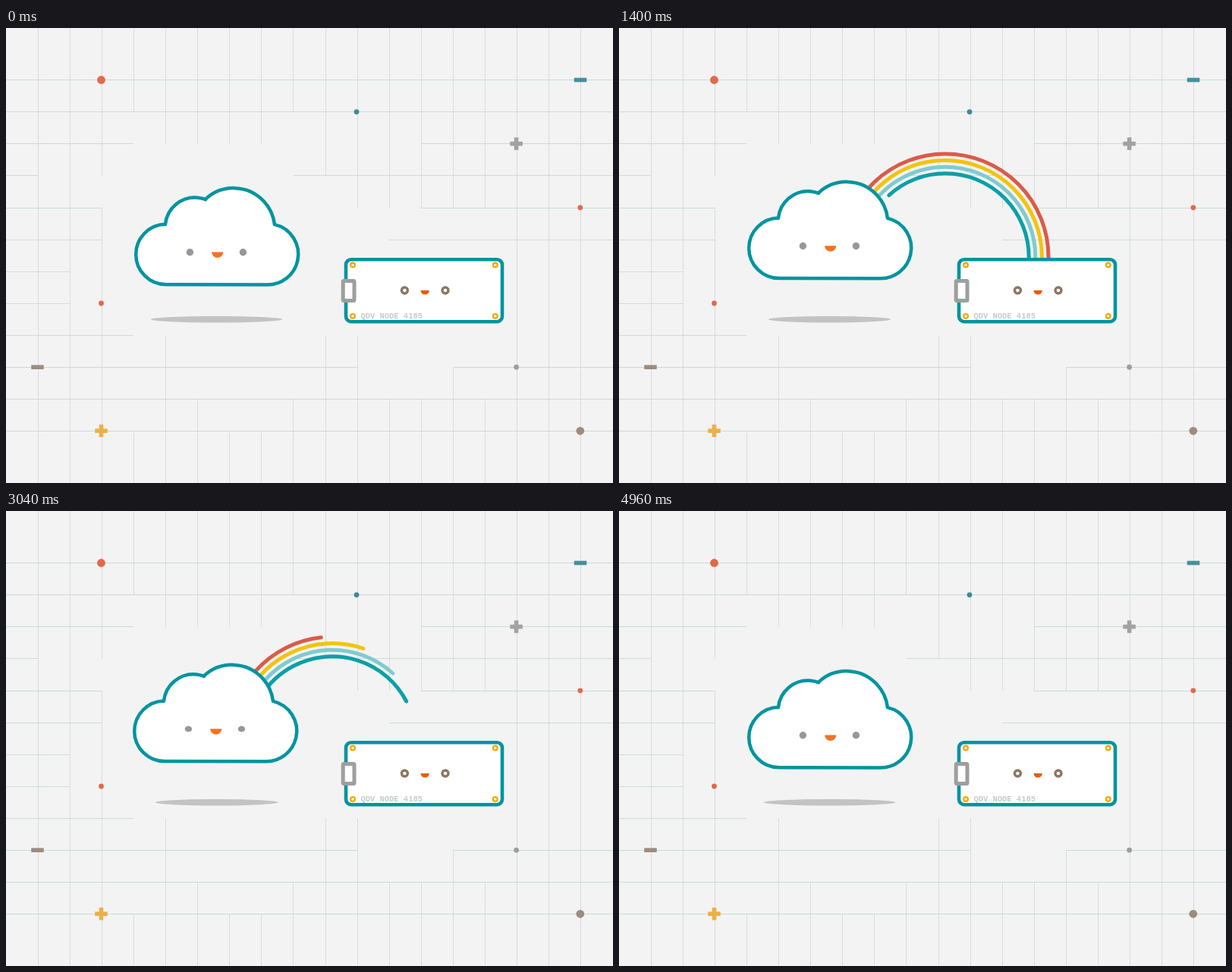
An HTML page with a canvas for the animation above (5 s loop, 800 px wide and 600 px high).

```html
<!DOCTYPE html>
<html lang="en">
<head>
<meta charset="utf-8">
<title>Cloud and board</title>
<style>
html, body { margin: 0; width: 100%; height: 100%; overflow: hidden; background: #f3f3f3; }
canvas { display: block; width: 800px; height: 600px; }
</style>
</head>
<body>
<canvas id="stage" width="800" height="600"></canvas>
<script>
const ctx = document.getElementById('stage').getContext('2d');
const LOOP = 5000, STEP = 40, CELL = 42.1, TOP = 68.6;
const TEAL = '#0094a0', ORANGE = '#e2694a', BROWN = '#9d8c80', GRAY = '#9e9e9e';
const clamp = (v, lo, hi) => Math.min(hi, Math.max(lo, v));
const sine = u => (1 - Math.cos(Math.PI * u)) / 2;
const soft = u => (sine(u) + u) / 2;

// Interpolates [time, value] keys; the ease shapes each stretch.
function keyed(t, keys, ease) {
  for (let i = 1; i < keys.length; i++) {
    const [t0, v0] = keys[i - 1], [t1, v1] = keys[i];
    if (t <= t1) return v0 + (v1 - v0) * ease(clamp((t - t0) / (t1 - t0), 0, 1));
  }
  return keys[keys.length - 1][1];
}

const BOB = [[0, 0], [840, 1], [1640, 0], [2480, 1], [3280, 0], [4150, 1], [4960, 0]];
const RECOIL = [[1640, 0], [2480, -6.6], [3280, 0]];
const CLOUD_BLINKS = [828, 3122], BOARD_BLINKS = [2102, 3740];

function openness(t, blinks) {
  return Math.min(...blinks.map(c => clamp(Math.abs(t - c) / 100, 0.15, 1)));
}

function ellipse(x, y, rx, ry, color) {
  ctx.fillStyle = color;
  ctx.beginPath();
  ctx.ellipse(x, y, rx, ry, 0, 0, Math.PI * 2);
  ctx.fill();
}
const dot = (x, y, r, color) => ellipse(x, y, r, r, color);

function bar(x, y, w, h, color) {
  ctx.fillStyle = color;
  ctx.fillRect(x - w / 2, y - h / 2, w, h);
}

function plus(x, y, color) {
  bar(x, y, 16.5, 5.6, color);
  bar(x, y, 5.6, 16.5, color);
}

function mouth(x, y, rx, ry, color) {
  ctx.fillStyle = color;
  ctx.beginPath();
  ctx.ellipse(x, y, rx, ry, 0, 0, Math.PI);
  ctx.fill();
}

function box(x, y, w, h, r, color, width) {
  ctx.beginPath();
  ctx.roundRect(x, y, w, h, r);
  ctx.fillStyle = '#fff';
  ctx.fill();
  ctx.strokeStyle = color;
  ctx.lineWidth = width;
  ctx.stroke();
}

// Grid gaps per line, in pixels from one edge to the other.
const ROW_GAPS = { 2: [168, 547], 3: [42, 379], 4: [126, 547], 5: [126, 505],
  6: [84, 800], 7: [84, 800], 8: [168, 800], 9: [463, 589] };
const COLUMN_GAPS = { 3: [195, 237], 4: [111, 532], 5: [153, 405], 6: [153, 490],
  7: [153, 532], 8: [153, 532], 9: [111, 490], 10: [195, 405], 11: [237, 405],
  12: [237, 490], 13: [237, 490], 14: [237, 447], 15: [237, 490] };

function drawGrid() {
  for (let i = 1; i < 19; i++) {
    const x = Math.floor(i * CELL);
    const [a, b] = COLUMN_GAPS[i] || [600, 600];
    ctx.fillStyle = '#d9dbdb';
    ctx.fillRect(x, 0, 1, a);
    ctx.fillRect(x, b, 1, 600 - b);
  }
  for (let i = 0; i < 12; i++) {
    const y = Math.floor(TOP + i * CELL);
    const [a, b] = ROW_GAPS[i] || [800, 800];
    ctx.fillStyle = [3, 5, 6, 7, 8].includes(i) ? '#d0dbd9' : '#c6dcd8';
    ctx.fillRect(0, y, a, 1);
    ctx.fillRect(b, y, 800 - b, 1);
  }
}

function drawMarks() {
  dot(125.5, 68.5, 5.4, ORANGE);
  bar(757, 68.5, 16.5, 5.6, '#45909c');
  dot(462, 110.6, 3.4, '#418996');
  plus(672.6, 152.6, '#a2a2a2');
  dot(756.8, 236.8, 3.4, ORANGE);
  dot(125.5, 363, 3.4, ORANGE);
  bar(41.5, 447.2, 16.5, 5.6, BROWN);
  dot(672.6, 447.2, 3.4, GRAY);
  plus(125.5, 531.2, '#ebb04a');
  dot(756.8, 531.3, 5.4, BROWN);
}

function drawRainbow(t) {
  const colors = ['#da5b4a', '#f3c30f', '#80cbcf', '#0ba0a8'];
  ctx.lineWidth = 5;
  ctx.lineCap = 'round';
  colors.forEach((color, i) => {
    const reach = start => Math.PI * sine(clamp((t - start - i * 133) / 1500, 0, 1));
    const head = reach(17), tail = reach(2257);
    if (head - tail < 0.001) return;
    ctx.strokeStyle = color;
    ctx.beginPath();
    ctx.arc(430, 302, 136 - i * 8.6, -tail, -head, true);
    ctx.stroke();
  });
}

function drawBoard(t) {
  box(448, 305.2, 206, 82, 7, TEAL, 4.6);
  for (const x of [457, 644.8]) for (const y of [312.6, 380]) {
    dot(x, y, 4, '#f0ab00');
    dot(x, y, 1.7, '#fff');
  }
  box(444.2, 333.6, 14.8, 25.8, 1, GRAY, 5);
  const open = openness(t, BOARD_BLINKS);
  for (const x of [525.4, 579]) {
    ellipse(x, 346, 5.7, 5.7 * open, '#8c7560');
    ellipse(x, 346, 2.3, 2.3 * open, '#fff');
  }
  mouth(552.2, 346, 5.7, 5.6, '#ea5b0c');
  ctx.fillStyle = '#c6cacb';
  ctx.font = 'bold 10.45px "Liberation Mono", monospace';
  ctx.fillText('QDV NODE 4185', 467.5, 383.2);
}

function cloudLobe(x, y, r, from, to) {
  const angle = ([px, py]) => Math.atan2(py - y, px - x);
  ctx.arc(x, y, r, angle(from), angle(to));
}

function drawCloud(t) {
  const lift = keyed(t, BOB, soft);
  ellipse(277.6, 384.2, 86.5 - 20 * keyed(t, BOB, u => u), 4.3, '#c3c3c3');

  ctx.save();
  ctx.translate(keyed(t, RECOIL, u => u), -32.6 * lift);
  const left = [210, 259], notch = [263, 226], right = [354, 259];
  ctx.beginPath();
  cloudLobe(211, 298.5, 39.8, [211, 339], left);
  cloudLobe(249, 262.7, 39.2, left, notch);
  cloudLobe(300, 265.4, 54.3, notch, right);
  cloudLobe(345, 298.3, 40.2, right, [345, 339]);
  ctx.closePath();
  ctx.fillStyle = '#fff';
  ctx.fill();
  ctx.strokeStyle = TEAL;
  ctx.lineWidth = 4.5;
  ctx.lineJoin = 'round';
  ctx.stroke();

  const open = openness(t, CLOUD_BLINKS);
  for (const x of [242.4, 312.4]) ellipse(x, 295.7, 4.7, 4.7 * open, '#97979b');
  mouth(278.7, 295.4, 7.6, 7.6, '#f37321');
  ctx.restore();
}

function draw(now) {
  const t = Math.floor((now % LOOP) / STEP) * STEP;
  ctx.fillStyle = '#f3f3f3';
  ctx.fillRect(0, 0, 800, 600);
  drawGrid();
  drawMarks();
  drawRainbow(t);
  drawBoard(t);
  drawCloud(t);
}

let start;
function tick(now) {
  start ??= now;
  draw(now - start);
  requestAnimationFrame(tick);
}
draw(0);
requestAnimationFrame(tick);
</script>
</body>
</html>
```
